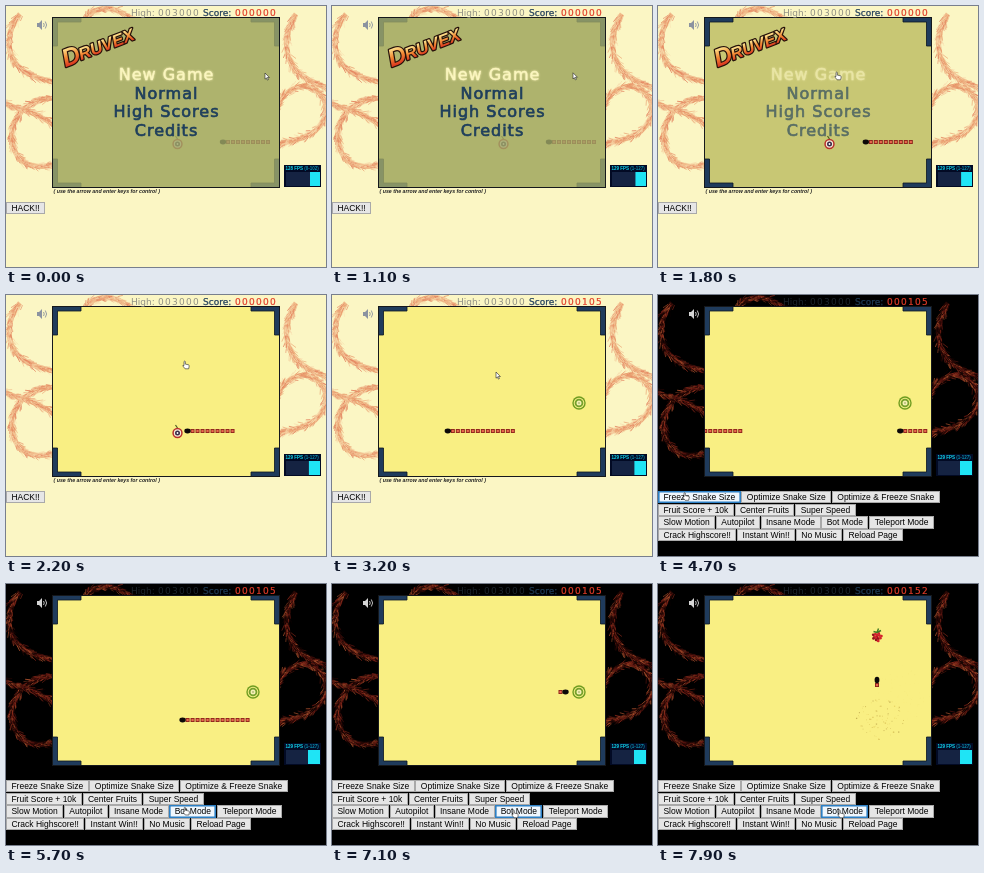
These frames come from a looping animation (320x261 px, 8000 ms). An HTML page with a canvas:

```html
<!DOCTYPE html>
<html lang="en">
<head>
<meta charset="utf-8">
<title>Arcade menu and hack panel</title>
<style>
  html, body { margin: 0; width: 100%; height: 100%; overflow: hidden; }
  body { position: relative; background: #fbf6c4; }
  body.dark { background: #000; }
  canvas, svg { position: absolute; left: 0; top: 0; width: 320px; height: 261px; }
  text { white-space: pre; }

  .head { font: 9px "DejaVu Sans", sans-serif; }
  .digits { letter-spacing: 1.28px; }
  #high { fill: #8f8f84; }
  #label { fill: #23405c; stroke: #23405c; stroke-width: .25; }
  #score { fill: #e23c28; stroke: #e23c28; stroke-width: .2; }
  .dark #high { fill: #1c242b; }
  .dark #label { fill: #1b3348; }
  #speaker { fill: #8b93a0; stroke: #8b93a0; }
  .dark #speaker { fill: #d4d4d4; stroke: #d4d4d4; }
  #hint { font: italic bold 5.25px "Liberation Sans", Arial, sans-serif; fill: #222; }
  .dark #hint { fill: #000; }
  #fps { font: bold 4.5px "Liberation Sans", Arial, sans-serif; fill: #10d8f0; }
  #range { fill: #0a8fb0; }

  #items text {
    font: 16px "DejaVu Sans", sans-serif; letter-spacing: 1px; text-anchor: middle;
    fill: #1f3f5c; stroke: #1f3f5c; stroke-width: .7;
  }
  #items .pick { fill: #fbf6c0; stroke: #fbf6c0; stroke-width: .4; filter: drop-shadow(0 0 1px #f6eeb0); }
  #logo text {
    font: italic bold 17px "Liberation Sans", Arial, sans-serif;
    fill: url(#fire); stroke: #24100a; stroke-width: 2.4; stroke-linejoin: round; paint-order: stroke;
  }
  #logo .big { font-size: 25px; }

  .panel { position: absolute; left: 0; top: 196px; }
  .row { display: flex; gap: .8px; height: 12.7px; }
  .row span {
    box-sizing: border-box; height: 12.3px; padding: 0 4.4px; white-space: nowrap;
    font: 8.5px/11px "Liberation Sans", Arial, sans-serif; color: #000;
    background: #e6e6e6; border: .7px solid #a9a9a9;
  }
  .row span.on { background: #f0f7fd; border-color: #2c7fc4; box-shadow: inset 0 0 0 .6px #2c7fc4; }
  #hacks, .dark #opener { display: none; }
  .dark #hacks { display: block; }
</style>
</head>
<body>
<canvas id="game"></canvas>

<svg viewBox="0 0 320 261">
  <defs>
    <linearGradient id="fire" x1="0" y1="0" x2="0" y2="1">
      <stop offset=".2" stop-color="#fde08a"/>
      <stop offset=".5" stop-color="#f28a34"/>
      <stop offset=".8" stop-color="#dc3a20"/>
    </linearGradient>
  </defs>

  <g class="head">
    <g id="high"><text x="125" y="10">High:</text><text class="digits" x="152" y="10">003000</text></g>
    <text id="label" x="197" y="10">Score:</text>
    <text id="score" class="digits" x="229" y="10">000000</text>
  </g>
  <g id="speaker">
    <path d="M31 17h2l3-3v10l-3-3h-2z" stroke="none"/>
    <path d="M37.5 17q1.5 2 0 4M39.3 15.5q2.6 3.5 0 7" fill="none" stroke-width=".9"/>
  </g>
  <text id="hint" x="47.5" y="187">( use the arrow and enter keys for control )</text>

  <rect x="278" y="159" width="37" height="22" fill="#020a24"/>
  <rect x="280" y="166" width="34" height="14" fill="#152342"/>
  <rect id="graph" y="166" height="14" fill="#1fe4f5"/>
  <text id="fps" x="279.5" y="164.4"><tspan id="rate"></tspan> FPS <tspan id="range"></tspan></text>

  <g id="items">
    <text class="pick" x="160.5" y="74">New Game</text>
    <text x="160.5" y="92.5">Normal</text>
    <text x="160.5" y="111">High Scores</text>
    <text x="160.5" y="130">Credits</text>
  </g>
  <g id="logo" transform="translate(60 60) rotate(-21)">
    <text class="big" x="-1" y="1">D</text><text x="16" y="0">RUVEX</text>
  </g>
</svg>

<div class="panel" id="opener"><div class="row"><span>HACK!!</span></div></div>
<div class="panel" id="hacks"></div>

<svg viewBox="0 0 320 261">
  <g id="cursor" stroke="#222" stroke-width=".6" stroke-linejoin="round" fill="#fff">
    <path id="arrow" d="M0 0v6.2l1.4-1.3 1 2.2 1-.5-1-2.1h2z"/>
    <path id="hand" d="M0 .5q.7-.8 1.3 0v2.6l3.2.7q.8.3.7 1.2l-.5 2.8h-3.6l-2.4-3q0-.9 1.3-.2z"/>
  </g>
</svg>

<script>
const LOOP = 8000, STEP = 100;
const START_AT = 1660, HACK_AT = 4600, BOT_AT = 6150;
const FADE = 400, GAP = 5, WRAP = 225;
const BOX = { x: 46.5, y: 11.5, w: 227, h: 170 };

const $ = id => document.getElementById(id);
const clamp = (v, a, b) => Math.min(b, Math.max(a, v));
const menuAlpha = t => clamp(1 - (t - START_AT) / FADE, 0, 1);

function seeded(seed) {
  return () => {
    seed = (seed + 0x6D2B79F5) | 0;
    let n = Math.imul(seed ^ (seed >>> 15), 1 | seed);
    n = (n + Math.imul(n ^ (n >>> 7), 61 | n)) ^ n;
    return ((n ^ (n >>> 14)) >>> 0) / 4294967296;
  };
}

// Rows of [time, x, y]; linear between rows.
function along(rows, t) {
  let i = 1;
  while (i < rows.length - 1 && rows[i][0] < t) i++;
  const [a, b] = [rows[i - 1], rows[i]];
  const u = clamp((t - a[0]) / (b[0] - a[0]), 0, 1);
  return { x: a[1] + (b[1] - a[1]) * u, y: a[2] + (b[2] - a[2]) * u, i, u };
}

// Head route; x runs past the left edge and is wrapped when drawn.
const route = [
  [0, 217, 136], [START_AT, 217, 136], [BOT_AT, -78, 136], [6383, -78, 108], [7100, 8.5, 108],
  [7170, 16, 108], [7395, 16, 135], [7578, -6, 135], [7900, -6, 96], [LOOP, -6, 84]
];
const pointer = [
  [0, 259, 67], [1000, 259, 67], [1450, 178, 66], [2200, 178, 66], [2700, 164, 77],
  [3500, 164, 77], [4300, 26, 197.5], [5000, 26, 197.5], [5600, 178, 223], [7000, 181, 226], [LOOP, 181, 226]
];
const scores = [[0, '000000'], [2370, '000105'], [7170, '000129'], [7520, '000152']];
const fruits = [
  { from: 0, to: 2370, x: 171.5, y: 138, draw: apple },
  { from: 2370, to: 7170, x: 247, y: 108, draw: kiwi },
  { from: 7170, to: 7520, x: 222, y: 135, draw: () => rings([5, '#c79a2c'], [3.6, '#fbf7c8'], [2, '#c79a2c']) },
  { from: 7520, to: LOOP, x: 219, y: 52, draw: berry }
];

const lens = [0];
route.slice(1).forEach((p, i) =>
  lens.push(lens[i] + Math.hypot(p[1] - route[i][1], p[2] - route[i][2])));
const track = route.map((p, i) => [lens[i], p[1], p[2]]).slice(1);

function travelled(t) {
  const { i, u } = along(route, t);
  return lens[i - 1] + (lens[i] - lens[i - 1]) * u;
}
const spot = d => d <= 0 ? { x: 217 - d, y: 136 } : along(track, d);
const wrap = x => 47 + (((x - 47) % WRAP) + WRAP) % WRAP;

const scale = Math.max(1, window.devicePixelRatio || 1);
function surface(c) {
  c.width = 320 * scale;
  c.height = 261 * scale;
  const g = c.getContext('2d');
  g.scale(scale, scale);
  return g;
}
const ctx = surface($('game'));

const vines = [
  'M14 8C0 24 0 48 12 60S34 72 50 77',
  'M50 92C26 92 4 108 6 132S22 164 50 159',
  'M-4 96C10 104 30 104 50 121',
  'M80 14C86 0 108-2 124 13',
  'M290 8C276 28 278 56 294 68S314 78 324 84',
  'M270 106C276 82 300 72 314 88S316 126 296 132S276 136 268 143'
];

function backdrop(base, core, tones) {
  const c = document.createElement('canvas'), g = surface(c), rnd = seeded(7);
  g.fillStyle = base;
  g.fillRect(0, 0, 320, 261);
  for (const d of vines) {
    const path = document.createElementNS('http://www.w3.org/2000/svg', 'path');
    path.setAttribute('d', d);
    g.strokeStyle = core;
    g.lineWidth = 5;
    g.stroke(new Path2D(d));
    const len = path.getTotalLength();
    for (let s = 0; s < len; s += .35) {
      const p = path.getPointAtLength(s), q = path.getPointAtLength(s + 1);
      const dir = Math.atan2(q.y - p.y, q.x - p.x);
      const off = (rnd() + rnd() - 1) * 3.6;
      const turn = dir + off * .16 + (rnd() - .5) * .5, size = 2.5 + rnd() * 4;
      const x = p.x - Math.sin(dir) * off, y = p.y + Math.cos(dir) * off;
      g.strokeStyle = tones[Math.floor(rnd() * tones.length)];
      g.lineWidth = .4 + rnd() * .5;
      g.beginPath();
      g.moveTo(x, y);
      g.lineTo(x + Math.cos(turn) * size, y + Math.sin(turn) * size);
      g.stroke();
    }
  }
  return c;
}
const light = backdrop('#fbf6c4', '#f0b988', ['#f3c898', '#eaa070', '#e38460', '#f8dcae']);
const dark = backdrop('#000', '#2a0906', ['#200604', '#5a1510', '#86281a', '#a8502c', '#0c0303']);

function rings(...layers) {
  for (const [r, fill] of layers) {
    ctx.fillStyle = fill;
    ctx.beginPath();
    ctx.arc(0, 0, r, 0, 7);
    ctx.fill();
  }
}
function stalk(color, width, d) {
  ctx.strokeStyle = color;
  ctx.lineWidth = width;
  ctx.stroke(new Path2D(d));
}
function apple() {
  stalk('#4a5a20', 1.2, 'M0-5L-2-8');
  rings([5.2, '#b8302c'], [3.7, '#f6ead8'], [2.5, '#3a2c48'], [.9, '#fff']);
}
function kiwi() {
  rings([6.7, '#6f9c20'], [5.3, '#f3ee84'], [4.3, '#76a02c'], [2.5, '#f4f0b4'], [.8, '#8a9a50']);
}
function berry() {
  for (let i = 0; i < 14; i++) {
    const a = i * 2.4, r = Math.sqrt(i) * 1.25;
    ctx.save();
    ctx.translate(Math.cos(a) * r, 1 + Math.sin(a) * r);
    rings([1.4, i % 3 ? '#d4222c' : '#92101c']);
    ctx.restore();
  }
  stalk('#3f7a22', 1.4, 'M-3.5-4.5L0-3.5L4-5.5M0-3.5L1.5-7.5');
}

function fillBox(color) {
  ctx.fillStyle = color;
  ctx.fillRect(BOX.x, BOX.y, BOX.w, BOX.h);
}
const shade = t => fillBox(`rgba(158, 166, 104, ${.82 * menuAlpha(t)})`);

function corners() {
  for (const [sx, sy] of [[1, 1], [-1, 1], [1, -1], [-1, -1]]) {
    ctx.save();
    ctx.translate(sx > 0 ? BOX.x : BOX.x + BOX.w, sy > 0 ? BOX.y : BOX.y + BOX.h);
    ctx.scale(sx, sy);
    ctx.fillStyle = '#1f3b5c';
    const corner = new Path2D('M0 0H28.5V4.5H5V28.5H0z');
    ctx.fill(corner);
    ctx.strokeStyle = '#0b1622';
    ctx.lineWidth = .8;
    ctx.stroke(corner);
    ctx.restore();
  }
}
function border() {
  ctx.strokeStyle = '#15181c';
  ctx.lineWidth = 1;
  ctx.strokeRect(BOX.x, BOX.y, BOX.w, BOX.h);
}

function snake(t) {
  const d = travelled(t);
  const count = t >= BOT_AT ? 1 : 9 + clamp(Math.floor((d - travelled(2370)) / GAP), 0, 4);
  for (let k = count; k > 0; k--) {
    const p = spot(d - k * GAP), x = wrap(p.x);
    ctx.fillStyle = '#8c221a';
    ctx.fillRect(x - 2, p.y - 2, 4, 4);
    ctx.fillStyle = '#e8694e';
    ctx.fillRect(x - 1.1, p.y - 1.1, 2.2, 2.2);
  }
  const p = spot(d), q = spot(d - 1);
  ctx.fillStyle = '#0c0808';
  ctx.beginPath();
  ctx.ellipse(wrap(p.x), p.y, 3.2, 2.4, Math.atan2(p.y - q.y, p.x - q.x), 0, 7);
  ctx.fill();
}

function burst(f, t, seed) {
  const u = (t - f.to) / 750;
  if (u < 0 || u >= 1) return;
  const rnd = seeded(seed), reach = 32 * (1 - (1 - u) ** 2);
  for (let i = 0; i < 80; i++) {
    const a = rnd() * 6.283, r = Math.sqrt(rnd()) * reach, size = .6 + rnd() * .7;
    ctx.globalAlpha = (1 - u) * (.5 + rnd() * .5);
    ctx.fillStyle = ['#b8902a', '#d6b440', '#8c6a20'][i % 3];
    ctx.fillRect(f.x + Math.cos(a) * r, f.y + Math.sin(a) * r * .85, size, size);
  }
  ctx.globalAlpha = 1;
}

function actors(t) {
  ctx.save();
  ctx.beginPath();
  ctx.rect(BOX.x + .5, BOX.y + .5, BOX.w - 1, BOX.h - 1);
  ctx.clip();
  fruits.forEach((f, i) => {
    burst(f, t, i + 11);
    if (t < f.from || t >= f.to) return;
    ctx.save();
    ctx.translate(f.x, f.y);
    f.draw();
    ctx.restore();
  });
  snake(t);
  ctx.restore();
}

// The menu shade covers the idle board; once play starts it fades out beneath it.
function play(t) {
  const running = t >= START_AT;
  ctx.drawImage(t < HACK_AT ? light : dark, 0, 0, 320, 261);
  fillBox('#f9ef83');
  if (running) shade(t);
  corners();
  actors(t);
  if (!running) shade(t);
  border();
}

const rows = [
  'Freeze Snake Size|Optimize Snake Size|Optimize & Freeze Snake',
  'Fruit Score + 10k|Center Fruits|Super Speed',
  'Slow Motion|Autopilot|Insane Mode|Bot Mode|Teleport Mode',
  'Crack Highscore!!|Instant Win!!|No Music|Reload Page'
];
for (const line of rows) {
  const row = document.createElement('div');
  row.className = 'row';
  for (const name of line.split('|')) {
    const b = document.createElement('span');
    b.textContent = name;
    row.append(b);
  }
  $('hacks').append(row);
}
const buttons = [...document.querySelectorAll('#hacks span')];

function page(t) {
  document.body.classList.toggle('dark', t >= HACK_AT);
  $('score').textContent = scores.filter(s => s[0] <= t).pop()[1];
  $('rate').textContent = t < 1000 ? '128' : '129';
  $('range').textContent = t < 1000 ? '(0-102)' : '(1-127)';
  const w = 10 + 2 * Math.min(1, t / 4000);
  $('graph').setAttribute('x', 314 - w);
  $('graph').setAttribute('width', w);

  const alpha = menuAlpha(t);
  $('items').style.opacity = alpha;
  $('logo').style.opacity = Math.min(1, alpha * 1.6);

  const { x, y } = along(pointer, t);
  const hand = (t > 1350 && t < 2250) || t > 4250;
  $('cursor').setAttribute('transform', `translate(${x} ${y})`);
  $('hand').style.display = hand ? '' : 'none';
  $('arrow').style.display = hand ? 'none' : '';
  for (const b of buttons) {
    const r = b.getBoundingClientRect();
    b.classList.toggle('on', x >= r.left && x < r.right && y >= r.top && y < r.bottom);
  }
}

function tick() {
  const t = Math.floor((performance.now() % LOOP) / STEP) * STEP;
  play(t);
  page(t);
  requestAnimationFrame(tick);
}
tick();
</script>
</body>
</html>
```
